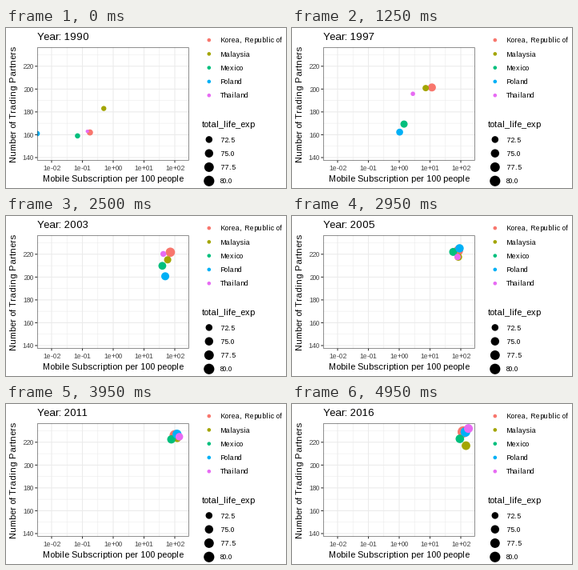
A matplotlib script that plays this animation: 350 px wide and 200 px high, repeating every 5000 ms.

```python
import numpy as np
import matplotlib.pyplot as plt
from matplotlib.animation import FuncAnimation
from matplotlib.patches import Rectangle

plt.rcParams["font.family"] = "Liberation Sans"
plt.rcParams["text.hinting"] = "force_autohint"
plt.rcParams["text.hinting_factor"] = 1  # whole-pixel letter spacing

W, H, DPI = 350, 200, 72  # at 72 dpi one point is one pixel
FRAMES, INTERVAL = 100, 50
FIRST, LAST = 1990, 2016
LEFT, RIGHT, TOP, BOTTOM = 39.0, 228.8, 24.4, 165.6
KEY_X, KEY_STEP = 253.8, 17.28
SMALL, MEDIUM, LARGE = 9, 11, 13
GRID, DARK, GREY = "#EBEBEB", "#333333", "#4D4D4D"
LIFE_MIN, LIFE_MAX = 69.8, 82.3

# mobile: final log level, growth rate, midpoint, year and height of a bump
# partners: turning points; life: first value, last value, easing power
COUNTRIES = [
    dict(name="Korea, Republic of", color="#F8766D",
         mobile=(2.08, 0.27, 1999.05, 1998.8, 0.1),
         partners={1990: 162, 1994: 204, 1997: 201, 2000: 220, 2016: 229},
         life=(71.7, 82.3, 1)),
    dict(name="Malaysia", color="#A3A500",
         mobile=(2.17, 0.175, 2001.9, 1999, -0.16),
         partners={1990: 183, 1994: 200, 1997: 201, 2001: 213, 2005: 217,
                   2011: 224, 2016: 217},
         life=(70.7, 75.6, 1)),
    dict(name="Mexico", color="#00BF7D",
         mobile=(1.97, 0.23, 2001.9, 1996.6, -0.27),
         partners={1990: 159, 1997: 170, 2005: 222, 2016: 223},
         life=(70.8, 75.4, 0.5)),
    dict(name="Poland", color="#00B0F6",
         mobile=(2.15, 0.38, 2001.4, 2002.5, -0.2),
         partners={1990: 161, 1993: 142, 1994: 161, 1998: 163, 1999: 153,
                   2001: 173, 2005: 225, 2016: 229},
         life=(70.9, 77.9, 1)),
    dict(name="Thailand", color="#E76BF3",
         mobile=(2.25, 0.19, 2004.2, 1999.5, -0.42),
         partners={1990: 163, 1994: 195, 1997: 196, 2001: 224, 2005: 217,
                   2016: 232},
         life=(69.85, 76.0, 2)),
]
COLORS = [c["color"] for c in COUNTRIES]


def x_px(log_value):
    return 134 + 38.5 * log_value


def y_px(value):
    return 47.8 + 1.427 * (220 - value)


def log_mobile(year, level, rate, middle, bump_year, bump):
    """Logistic adoption on a log scale, with slow late growth and a bump."""
    ceiling = level + 0.015 * (year - LAST)
    logistic = np.log10(1 + 10 ** (rate * (middle - year)))
    return ceiling - logistic + bump * np.exp(-((year - bump_year) / 2) ** 2)


def life_exp(year, start, end, power):
    t = (year - FIRST) / (LAST - FIRST)
    return start + (end - start) * t ** power


def radius(size):
    return 0.375 * (2.845 * size + 0.94) + 0.35


def life_radius(life):
    share = (np.asarray(life) - LIFE_MIN) / (LIFE_MAX - LIFE_MIN)
    return radius(1 + 5 * np.sqrt(share))


def area(r):
    return (2 * np.asarray(r)) ** 2


def state(year):
    """Positions and marker areas of all countries at a fractional year."""
    x = [max(LEFT, x_px(log_mobile(year, *c["mobile"]))) for c in COUNTRIES]
    y = [y_px(np.interp(year, list(c["partners"]),
                        list(c["partners"].values()))) for c in COUNTRIES]
    life = [life_exp(year, *c["life"]) for c in COUNTRIES]
    return np.column_stack([x, y]), area(life_radius(life))


fig = plt.figure(figsize=(W / DPI, H / DPI), dpi=DPI, facecolor="white")
ax = fig.add_axes([0, 0, 1, 1])
ax.set_xlim(0, W)
ax.set_ylim(H, 0)
ax.axis("off")


def line(x, y, color, width):
    ax.plot(x, y, color=color, lw=width, solid_capstyle="butt", snap=False,
            zorder=width)


def label(x, y, text, size, color="black", **kw):
    return ax.text(x, y, text, fontsize=size, color=color, va="baseline", **kw)


def frame_rect(inset, **kw):
    return Rectangle((LEFT + inset, TOP + inset), RIGHT - LEFT - 2 * inset,
                     BOTTOM - TOP - 2 * inset, transform=ax.transData, **kw)


# Grid, ticks and panel border
for e in range(-2, 3):
    x = x_px(e)
    line([x, x], [TOP, BOTTOM], GRID, 1.07)
    line([x, x], [BOTTOM, BOTTOM + 2.75], DARK, 1.07)
    label(x, 178, f"1e{e:+03d}", SMALL, GREY, ha="center")
    if e < 2:
        line([x + 19.25] * 2, [TOP, BOTTOM], GRID, 0.53)

for v in range(140, 231, 10):
    y = y_px(v)
    major = v % 20 == 0
    line([LEFT, RIGHT], [y, y], GRID, 1.07 if major else 0.53)
    if major:
        line([LEFT - 2.75, LEFT], [y, y], DARK, 1.07)
        label(34.2, y + 3.2, str(v), SMALL, GREY, ha="right")

ax.add_patch(frame_rect(0.27, fill=False, ec=DARK, lw=0.54, snap=False,
                        zorder=4))

label(134, 192, "Mobile Subscription per 100 people", MEDIUM, ha="center")
label(13, 95, "Number of Trading Partners", MEDIUM, ha="center",
      rotation=90, rotation_mode="anchor")
title = label(39, 15, "", LARGE)


def legend(top, names, sizes, colors):
    rows = top + KEY_STEP * np.arange(len(names))
    ax.scatter(np.full(len(names), KEY_X), rows, s=sizes, c=colors, lw=0)
    for y, name in zip(rows, names):
        label(267.5, y + 3.2, name, SMALL)


lives = [72.5, 75.0, 77.5, 80.0]
legend(15.1, [c["name"] for c in COUNTRIES], area(radius(1.5)), COLORS)
label(245, 124, "total_life_exp", MEDIUM)
legend(139.4, lives, area(life_radius(lives)), "black")

points, areas = state(FIRST)
dots = ax.scatter(*points.T, s=areas, c=COLORS, lw=0, zorder=3)
dots.set_clip_path(frame_rect(0))


def update(i):
    year = FIRST + (LAST - FIRST) * i / (FRAMES - 1)
    points, areas = state(year)
    dots.set_offsets(points)
    dots.set_sizes(areas)
    title.set_text(f"Year: {round(year)}")
    return dots, title


anim = FuncAnimation(fig, update, frames=FRAMES, interval=INTERVAL,
                     repeat=True, repeat_delay=0)
plt.show()
```
